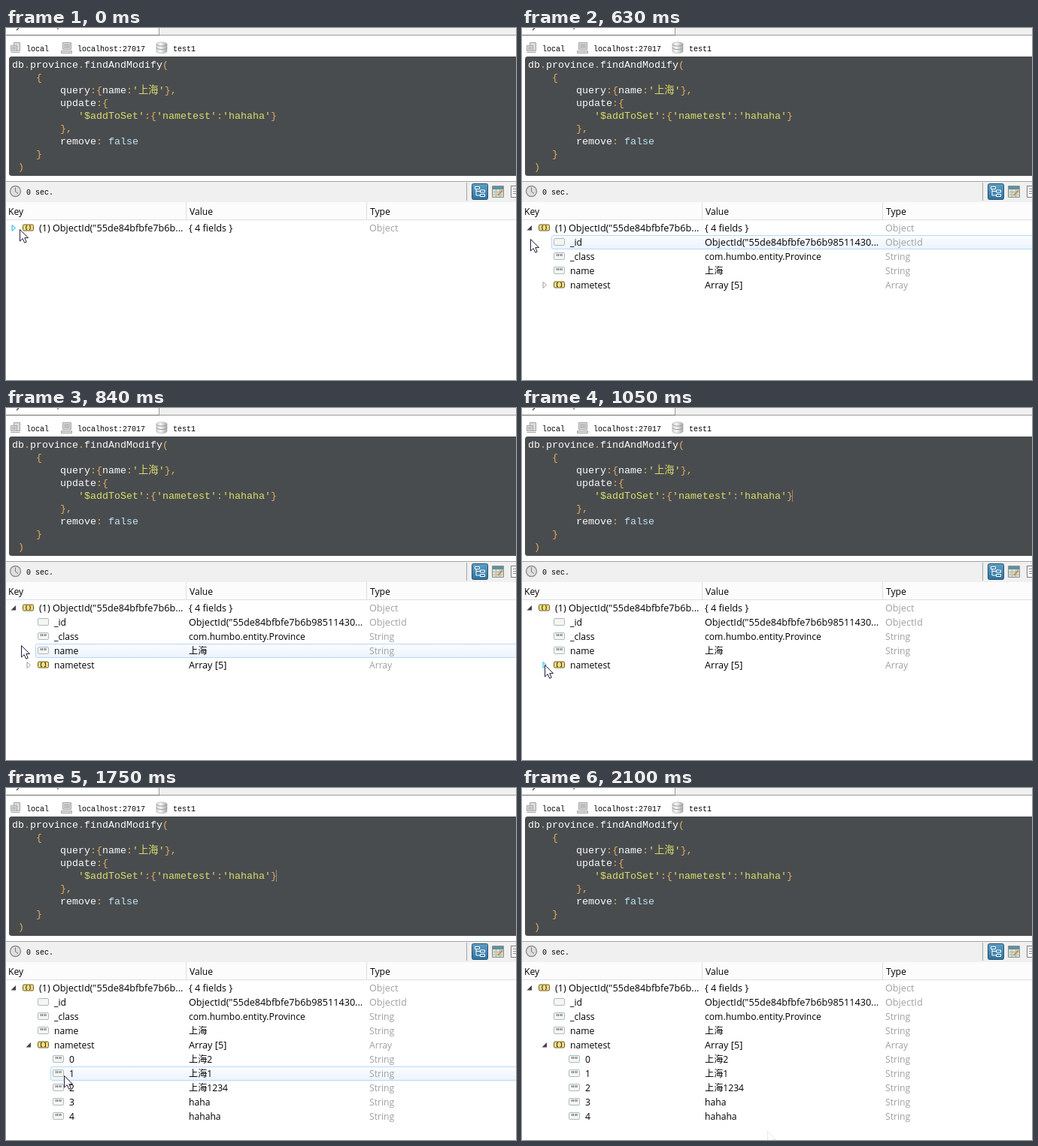
An HTML page for the animation above (2800 ms loop, 678 by 469 pixels).

```html
<!DOCTYPE html>
<html lang="en">
<head>
<meta charset="utf-8">
<title>Query result tree</title>
<style>
  html, body { margin: 0; width: 100%; height: 100%; overflow: hidden; background: #fff; }
  #stage { position: relative; width: 678px; height: 469px; overflow: hidden; }
  svg { position: absolute; left: 0; top: 0; }
  text { font: 12.15px "Open Sans", "Noto Sans CJK SC", "Noto Sans CJK", sans-serif; fill: #000; }
  .mono { font: 10px "Liberation Mono", monospace; }
  .type { fill: #a0a0a0; }
  .id { font-size: 12.65px; }
  pre {
    position: absolute; left: 8px; top: 41px; margin: 0; color: #fafafa;
    font: 13.333px/17px "Liberation Mono", "Noto Sans CJK SC", "Noto Sans CJK", monospace;
  }
  .str { color: #dadd69; }
  .op { color: #e3ab62; }
  .key { color: #bfe3f8; }

  .anim { animation: 2.8s step-end infinite; }
  #pointer { animation-name: pointer; }
  #caret { animation-name: caret; }
  #hover { animation-name: hover; }
  #hoverDeep { animation-name: hover-deep; }
  #fields { animation-name: fields; }
  #items { animation-name: items; }
  #rootClosed { animation-name: root-closed; }
  #rootOpenHot { animation-name: root-hot; }
  #rootOpen { animation-name: root-open; }
  #listClosed { animation-name: list-closed; }
  #listClosedHot { animation-name: list-closed-hot; }
  #listOpenHot { animation-name: list-open-hot; }
  #listOpen { animation-name: list-open; }

  @keyframes pointer {
    0% { transform: translate(18px, 268px); }
    2.5% { transform: translate(16px, 268px); }
    7.5% { transform: translate(13px, 268px); }
    10% { transform: translate(11px, 267px); }
    22.5% { transform: translate(11px, 281px); }
    25% { transform: translate(13px, 296px); }
    27.5% { transform: translate(17px, 307px); }
    30% { transform: translate(20px, 316px); }
    32.5% { transform: translate(24px, 327px); }
    35% { transform: translate(28px, 336px); }
    37.5% { transform: translate(30px, 342px); }
    40% { transform: translate(31px, 344px); }
    62.5% { transform: translate(77px, 383px); }
    65% { transform: translate(118px, 398px); }
    67.5% { transform: translate(170px, 415px); }
    70% { transform: translate(226px, 430px); }
    72.5% { transform: translate(280px, 444px); opacity: 1; }
    75%, 100% { transform: translate(326px, 457px); opacity: .1; }
  }
  @keyframes hover {
    0% { opacity: 0; }
    22.5% { opacity: 1; transform: translateY(276px); }
    25% { opacity: 1; transform: translateY(295px); }
    30% { opacity: 1; transform: translateY(314px); }
    35%, 100% { opacity: 0; }
  }
  @keyframes hover-deep {
    0% { opacity: 0; }
    62.5% { opacity: 1; transform: translateY(371px); }
    65% { opacity: 1; transform: translateY(390px); }
    67.5% { opacity: 1; transform: translateY(409px); }
    70% { opacity: 1; transform: translateY(428px); }
    75%, 100% { opacity: 0; }
  }
  @keyframes caret { 0% { opacity: 0; } 37.5% { opacity: 1; } 67.5%, 100% { opacity: 0; } }
  @keyframes fields { 0% { opacity: 0; } 15%, 100% { opacity: 1; } }
  @keyframes items { 0% { opacity: 0; } 45%, 100% { opacity: 1; } }
  @keyframes root-closed { 0% { opacity: 1; } 15%, 100% { opacity: 0; } }
  @keyframes root-hot { 0% { opacity: 0; } 15% { opacity: 1; } 22.5%, 100% { opacity: 0; } }
  @keyframes root-open { 0% { opacity: 0; } 22.5%, 100% { opacity: 1; } }
  @keyframes list-closed { 0% { opacity: 0; } 15% { opacity: 1; } 35%, 100% { opacity: 0; } }
  @keyframes list-closed-hot { 0% { opacity: 0; } 35% { opacity: 1; } 45%, 100% { opacity: 0; } }
  @keyframes list-open-hot { 0% { opacity: 0; } 45% { opacity: 1; } 62.5%, 100% { opacity: 0; } }
  @keyframes list-open { 0% { opacity: 0; } 62.5%, 100% { opacity: 1; } }
</style>
</head>
<body>
<div id="stage">
  <svg width="678" height="469">
    <defs>
      <linearGradient id="rowGlow" x2="0" y2="1">
        <stop stop-color="#fbfdff"/><stop offset="1" stop-color="#ebf3fd"/>
      </linearGradient>
      <linearGradient id="press" x2="0" y2="1">
        <stop stop-color="#5e9fc6"/><stop offset="1" stop-color="#2f729d"/>
      </linearGradient>
      <linearGradient id="metal">
        <stop stop-color="#d9d9d9"/><stop offset=".4" stop-color="#f6f6f6"/><stop offset="1" stop-color="#a8a8a8"/>
      </linearGradient>
      <path id="closed" d="M.5 .5V8.5L5 4.5Z"/>
      <path id="open" d="M0 6.5H6.5V0Z"/>
    </defs>

    <!-- tab strip -->
    <path d="M204 0H678V9H204Z" fill="#f0f0f0"/>
    <path d="M203.5 0V9.5H678" fill="none" stroke="#9b9b9b"/>
    <path d="M0 9.5H204" stroke="#6c6c6c"/>
    <path d="M14 3L17 0" stroke="#555" stroke-width="1.5"/>
    <path d="M69 0V2" stroke="#333"/>

    <!-- connection bar -->
    <g fill="#dcdcdc" stroke="#a3a3a3">
      <path d="M10.5 19.5H18.5V30.5H10.5Z"/>
      <path d="M6.5 23.5H14.5V30.5H6.5ZM6.5 32.5H18.5"/>
      <path d="M75.5 19.5H86.5V28.5H75.5ZM73.5 30.5H87.5V33.5H73.5Z"/>
    </g>
    <path d="M8 25H13V29H8ZM77 21H85V27H77Z" fill="#b9bfc2"/>
    <path d="M200 21.5C200 18 214 18 214 21.5V31C214 34.5 200 34.5 200 31Z" fill="url(#metal)" stroke="#aaa" stroke-width=".7"/>
    <path d="M200 21.5C200 25 214 25 214 21.5M200 26C200 29.5 214 29.5 214 26" fill="none" stroke="#999"/>
    <text class="mono" x="27" y="31">local</text>
    <text class="mono" x="95" y="31">localhost:27017</text>
    <text class="mono" x="222" y="31">test1</text>

    <!-- editor -->
    <rect x="4" y="38" width="690" height="159" rx="3.5" fill="#494c4e"/>
    <path id="caret" class="anim" d="M359.5 109V125" stroke="#93857f"/>

    <!-- status bar -->
    <path d="M0 205H678V232H0Z" fill="#f0f0f0"/>
    <path d="M0 204.5H678M612.5 206V230" stroke="#a5a5a5"/>
    <circle cx="12.5" cy="217.5" r="7" fill="#dedede" stroke="#8e8e8e" stroke-width="1.4"/>
    <path d="M12.5 212.5V218L16 220.5" fill="none" stroke="#777"/>
    <text class="mono" x="27" y="222">0 sec.</text>
    <rect x="619.5" y="207.5" width="21" height="21" rx="2" fill="url(#press)" stroke="#28536f"/>
    <path d="M625 213V223H630M625 217.5H630" fill="none" stroke="#fff"/>
    <path d="M623.5 211.5H629.5V214.5H623.5ZM630.5 216H636.5V219H630.5ZM630.5 221.5H636.5V224.5H630.5Z" fill="#3a7ba5" stroke="#fff"/>
    <path d="M646.5 210.5H661.5V225.5H646.5Z" fill="#d9ddcf" stroke="#87938f"/>
    <path d="M647 211H661V215H647Z" fill="#5f8fa3"/>
    <path d="M647 218.5H661M647 222H661M651.5 215V225M656.5 215V225" stroke="#b0b9a9"/>
    <path d="M654 223L660 216" stroke="#c29256" stroke-width="2"/>
    <path d="M671.5 210.5H684V225.5H671.5Z" fill="#fff" stroke="#777"/>
    <path d="M674 214.5H678M674 217.5H678M674 220.5H678" stroke="#888"/>

    <!-- column heads -->
    <path d="M0 232H678V255H0Z" fill="#fcfcfd"/>
    <path d="M0 255.5H678M239.5 232V255M479.5 232V255" stroke="#dcdfe4"/>
    <text x="3" y="249">Key</text>
    <text x="244" y="249">Value</text>
    <text x="484" y="249">Type</text>

    <!-- tree -->
    <g fill="url(#rowGlow)" stroke="#bad7f3">
      <rect id="hover" class="anim" x="39.5" y=".5" width="650" height="18" rx="2"/>
      <rect id="hoverDeep" class="anim" x="59.5" y=".5" width="630" height="18" rx="2"/>
    </g>
    <g id="root"></g>
    <g id="fields" class="anim"></g>
    <g id="items" class="anim"></g>

    <g id="rootClosed" class="anim"><use href="#closed" x="7.5" y="262" fill="#d8f4fd" stroke="#27b4ea"/></g>
    <g id="rootOpenHot" class="anim"><use href="#open" x="6.5" y="263" fill="#35b9ec"/></g>
    <g id="rootOpen" class="anim"><use href="#open" x="6.5" y="263" fill="#404040"/></g>
    <g id="listClosed" class="anim"><use href="#closed" x="27.5" y="338" fill="#fff" stroke="#9a9a9a"/></g>
    <g id="listClosedHot" class="anim"><use href="#closed" x="27.5" y="338" fill="#d8f4fd" stroke="#27b4ea"/></g>
    <g id="listOpenHot" class="anim"><use href="#open" x="26.5" y="339" fill="#5ab8ec"/></g>
    <g id="listOpen" class="anim"><use href="#open" x="26.5" y="339" fill="#4a3f52"/></g>

    <g id="pointer" class="anim">
      <path d="M.5 .5V16L4.2 12.6 6.7 18.2 9.2 17.1 6.8 11.6H11.5Z" fill="#fff" stroke="#241d38"/>
    </g>
  </svg>
  <pre id="code"></pre>
</div>
<script>
  const $ = id => document.getElementById(id);

  const query = `db.province.findAndModify(
    {
        query:{name:'上海'},
        update:{
           '$addToSet':{'nametest':'hahaha'}
        },
        remove: false
    }
 )`;
  $('code').innerHTML = query.replace(/('[^']*')|([{}().,:])|(false)/g, (token, str, op) =>
    `<span class="${str ? 'str' : op ? 'op' : 'key'}">${token}</span>`);

  // Glyphs inside the small type badges
  const glyphs = {
    object: 'M6 2.5H5V4.5L4 5 5 5.5V7.5H6M9 2.5H10V4.5L11 5 10 5.5V7.5H9',
    array: 'M6 2.5H4.5V7.5H6M9 2.5H10.5V7.5H9',
    string: 'M4.5 2V5M6.5 2V5M9 2V5M11 2V5',
    plain: ''
  };

  function badge(kind, x, y) {
    const gold = kind === 'object' || kind === 'array';
    const box = gold
      ? 'y="1" height="8" fill="#f3dd80" stroke="#6b5a28"'
      : 'y=".5" height="9" fill="#f5f6ef" stroke="#abbac3"';
    return `<g transform="translate(${x} ${y})">
      <rect x=".5" width="14" rx="1.5" ${box}/>
      <path d="${glyphs[kind]}" fill="none" stroke="${gold ? '#3c3210' : '#555d63'}"/></g>`;
  }

  function row(index, depth, kind, key, value, type) {
    const top = 257 + 19 * index, x = 22 + 20 * depth;
    const label = (at, words, style = '') =>
      `<text x="${at}" y="${top + 14}" class="${style} ${/[()[\]{]|Obj/.test(words) ? 'id' : ''}">${words}</text>`;
    return badge(kind, x, top + 4) + label(x + 22, key) + label(243, value) + label(483, type, 'type');
  }

  $('root').innerHTML = row(0, 0, 'object', '(1) ObjectId("55de84bfbfe7b6b...', '{ 4 fields }', 'Object');
  $('fields').innerHTML =
    row(1, 1, 'plain', '_id', 'ObjectId("55de84bfbfe7b6b98511430...', 'ObjectId') +
    row(2, 1, 'string', '_class', 'com.humbo.entity.Province', 'String') +
    row(3, 1, 'string', 'name', '上海', 'String') +
    row(4, 1, 'array', 'nametest', 'Array [5]', 'Array');
  $('items').innerHTML = ['上海2', '上海1', '上海1234', 'haha', 'hahaha']
    .map((value, i) => row(5 + i, 2, 'string', i, value, 'String')).join('');
</script>
</body>
</html>
```
